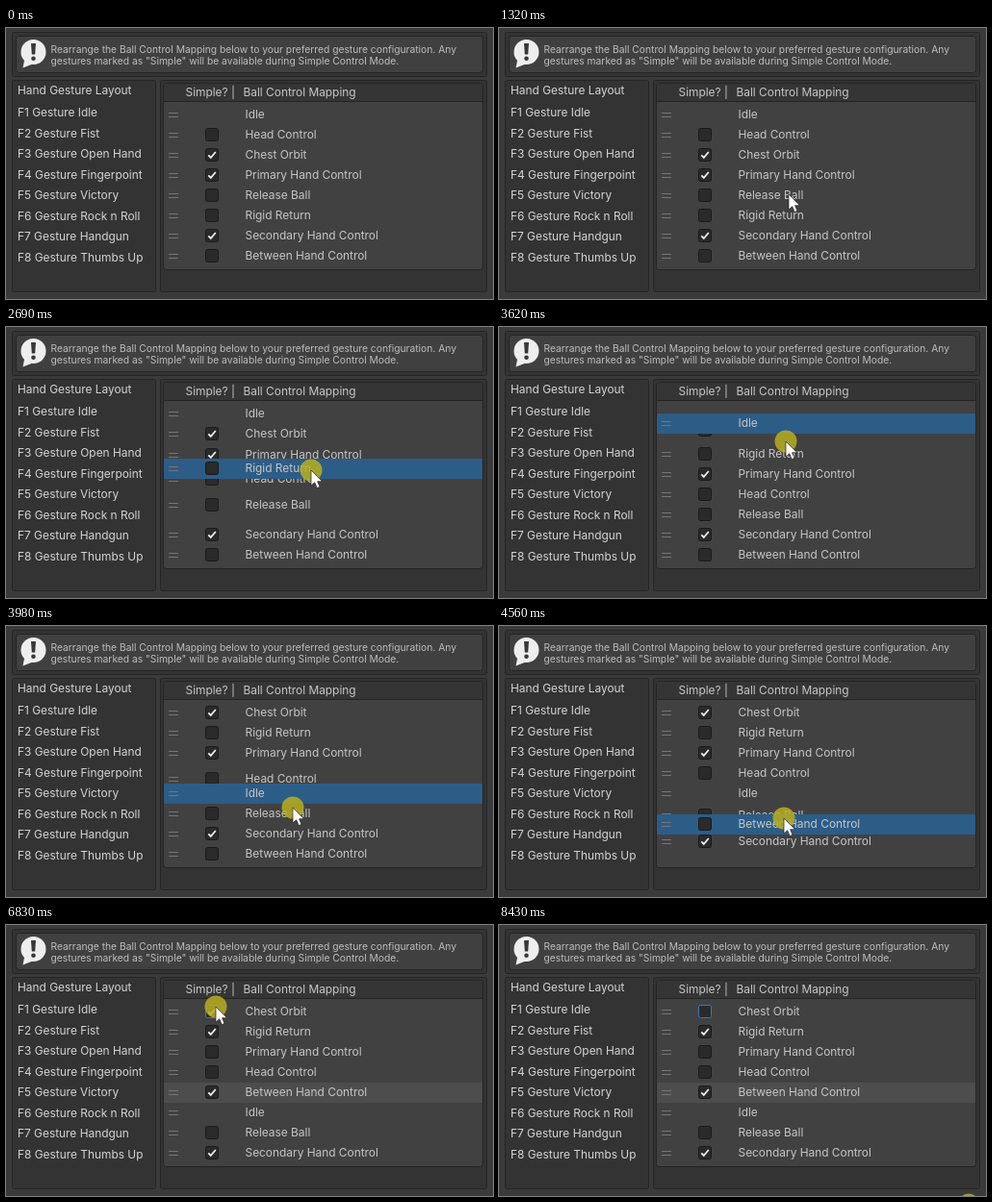
These frames come from a looping animation (506x282 px, 8.49 s). An HTML page:

```html
<!DOCTYPE html>
<html lang="en">
<head>
<meta charset="utf-8">
<title>Ball control mapping</title>
<style>
  html, body { margin: 0; width: 100%; height: 100%; overflow: hidden; background: #3a3a3a; }
  svg { display: block; width: 506px; height: 282px; }
  text { font: 11.9px Inter, sans-serif; fill: #c6c6c6; white-space: pre; }
  .label { fill: #d4d4d4; }
  .help { font-size: 10.27px; fill: #bdbdbd; }
  .panel { fill: #333; stroke: #252525; }
  .grip { stroke: #757575; }
  .box { fill: #2a2a2a; stroke: #1a1a1a; }
  .tick { fill: none; stroke: #f0f0f0; stroke-width: 1.7; }
</style>
</head>
<body>
<svg viewBox="0 0 506 282">
  <rect class="panel" x="6.5" y="4.5" width="493" height="46" rx="2"/>
  <rect x="10.5" y="8.5" width="485" height="38" rx="3" fill="#404040" stroke="#242424"/>
  <path d="M19 34 L17.5 41.5 L29 37 Z" fill="#eee"/>
  <circle cx="28.5" cy="25" r="13" fill="#eee"/>
  <path d="M26 16 H31 L30.2 27.5 H26.8 Z" fill="#383838"/>
  <circle cx="28.5" cy="31.8" r="2.3" fill="#383838"/>
  <text class="help" x="46.5" y="25.5">Rearrange the Ball Control Mapping below to your preferred gesture configuration. Any</text>
  <text class="help" x="46.5" y="37.5">gestures marked as "Simple" will be available during Simple Control Mode.</text>
  <rect class="panel" x="6.5" y="54.5" width="149" height="220" rx="2"/>
  <rect class="panel" x="160.5" y="54.5" width="339" height="220" rx="2"/>
  <g id="labels"></g>
  <rect x="163.5" y="57.5" width="332" height="194" rx="3" fill="#414141" stroke="#242424"/>
  <path d="M164 76 V60 Q164 58 166 58 H493 Q495 58 495 60 V76 Z" fill="#353535"/>
  <path d="M164 76.5 H495" stroke="#242424"/>
  <text x="186.5" y="71">Simple? |</text>
  <text x="246.5" y="71">Ball Control Mapping</text>
  <g id="rows"></g>
  <circle id="press" r="11.5" fill="#b9ae20" fill-opacity=".85"/>
  <path id="arrow" d="M0 0 V16 L3.7 12.7 L6.2 18.6 L9 17.4 L6.6 11.7 H11.6 Z" fill="#fff" stroke="#222" stroke-width=".7"/>
</svg>
<script>
(() => {
  const LOOP = 8490, PITCH = 21;
  const REACH = 18, SLIDE = 220;  // a row gives way at this distance, over this time
  const LEAD = 20, DROP = 50;     // the dragged row lags the pointer and drops late
  const $ = id => document.getElementById(id);
  const slot = i => 90 + PITCH * i;
  const clamp = k => Math.min(1, Math.max(0, k));
  const ease = k => k * k * (3 - 2 * k);
  const unease = p => 0.5 - Math.sin(Math.asin(1 - 2 * p) / 3);

  function make(parent, tag, attrs, text) {
    const el = document.createElementNS('http://www.w3.org/2000/svg', tag);
    for (const k in attrs) el.setAttribute(k, attrs[k]);
    if (text) el.textContent = text;
    return parent.appendChild(el);
  }

  ['Hand Gesture Layout', 'F1 Gesture Idle', 'F2 Gesture Fist', 'F3 Gesture Open Hand',
   'F4 Gesture Fingerpoint', 'F5 Gesture Victory', 'F6 Gesture Rock n Roll',
   'F7 Gesture Handgun', 'F8 Gesture Thumbs Up'].forEach((name, i) =>
    make($('labels'), 'text', { class: 'label', x: 12, y: i ? Math.round(70.8 + 21.5 * i) : 69 }, name));

  const [IDLE, HEAD, CHEST, PRIMARY, , RIGID, SECONDARY, BETWEEN] = [0, 1, 2, 3, 4, 5, 6, 7];
  const rows = ['Idle', 'Head Control', 'Chest Orbit', 'Primary Hand Control', 'Release Ball',
    'Rigid Return', 'Secondary Hand Control', 'Between Hand Control'].map(addRow);

  function addRow(name, i) {
    const g = make($('rows'), 'g', {});
    const row = { g, on: [CHEST, PRIMARY, SECONDARY].includes(i) };
    row.bar = make(g, 'rect', { x: 164, y: -10, width: 331, height: PITCH });
    make(g, 'path', { class: 'grip', d: 'M169 -1.5 H179 M169 2.5 H179' });
    if (i !== IDLE) {
      row.box = make(g, 'rect', { class: 'box', x: 207.5, y: -6.5, width: 13, height: 13, rx: 2 });
      row.tick = make(g, 'path', { class: 'tick', d: 'M210.3 0.3 L212.8 2.9 L217.8 -3' });
    }
    make(g, 'text', { x: 248.5, y: 4 }, name);
    return row;
  }

  // at/up: button down and up; from/till: span of the drag; grab: pointer below row centre
  const drags = [
    { row: HEAD, to: 3, at: 1560, from: 1590, till: 1900, up: 1960, x: 300, grab: 7, stop: 139 },
    { row: RIGID, to: 2, at: 2400, from: 2550, till: 2755, up: 2870, x: 317, grab: 10 },
    { row: IDLE, to: 4, at: 3440, from: 3533, till: 3953, up: 4060, x: 298, grab: 15 },
    { row: BETWEEN, to: 4, at: 4410, from: 4445, till: 4677, up: 4780, x: 296, grab: 3 }
  ];
  const clicks = [
    { row: BETWEEN, at: 5320, x: 212, y: 172 },
    { row: RIGID, at: 5850, x: 211, y: 106 },
    { row: PRIMARY, at: 6330, x: 216, y: 132 },
    { row: CHEST, at: 6800, x: 218, y: 85 },
    { row: -1, at: 8430, x: 488, y: 291 }
  ];
  for (const c of clicks) c.up = c.at + 100;

  function reorder(order, d) {
    order.splice(d.to, 0, ...order.splice(order.indexOf(d.row), 1));
  }

  const planned = [...rows.keys()];
  for (const d of drags) {
    d.index = planned.indexOf(d.row);
    d.y0 = slot(d.index);
    d.y1 = d.stop || slot(d.to);
    reorder(planned, d);
  }

  const dragY = (d, t) => d.y0 + (d.y1 - d.y0) * ease(clamp((t - d.from) / (d.till - d.from)));

  // how far the row at index i has given way to the dragged one
  function shift(d, i, t) {
    const dir = Math.sign(d.to - d.index), steps = (i - d.index) * dir;
    if (steps < 1 || steps > Math.abs(d.to - d.index)) return 0;
    const p = clamp((steps * PITCH - REACH) / Math.abs(d.y1 - d.y0));
    const begin = d.from + unease(p) * (d.till - d.from);
    return -dir * PITCH * clamp((t - begin) / SLIDE);
  }

  function layout(t) {
    const order = [...rows.keys()], ys = [];
    const done = drags.filter(d => t >= d.up + DROP);
    done.forEach(d => reorder(order, d));
    const d = drags[done.length];
    order.forEach((r, i) => {
      ys[r] = !d ? slot(i) : r === d.row ? dragY(d, t) : slot(i) + shift(d, i, t);
    });
    return ys;
  }

  // places where the pointer works; it glides from one to the next
  const still = (begin, end, x, y) => ({ begin, end, x, y: () => y });
  const stops = [
    still(0, 1010, 304, 300),
    ...drags.map(d => ({ begin: d.at - 60, end: d.up + 60, x: d.x, y: t => dragY(d, t + LEAD) + d.grab })),
    ...clicks.map(c => still(c.at - 190, c.at + 160, c.x, c.y))
  ];
  stops.splice(-1, 0, still(7140, 8200, 236, 300));

  function pointer(t) {
    const i = stops.findIndex(s => t < s.end), b = stops[i];
    if (t >= b.begin) return [b.x, b.y(t)];
    const a = stops[i - 1], k = ease((t - a.end) / (b.begin - a.end));
    const ay = a.y(a.end), by = b.y(b.begin);
    return [a.x + (b.x - a.x) * k, ay + (by - ay) * k];
  }

  const latest = (list, t) => {
    const hit = list.filter(a => a.row >= 0 && a.at <= t).pop();
    return hit ? hit.row : -1;
  };
  const place = (el, x, y) => el.setAttribute('transform', `translate(${Math.round(x)} ${Math.round(y)})`);
  const show = (el, on) => { el.style.visibility = on ? 'visible' : 'hidden'; };

  function draw(t) {
    const active = latest(drags, t), focused = latest(clicks, t), ys = layout(t);
    rows.forEach((row, i) => {
      place(row.g, 0, ys[i]);
      row.bar.style.fill = i !== active ? 'none' : focused < 0 ? '#2c5d87' : '#4d4d4d';
      if (!row.box) return;
      const flipped = clicks.some(c => c.row === i && t >= c.up);
      show(row.tick, row.on !== flipped);
      row.box.style.stroke = i === focused ? '#3a79bb' : '';
    });
    if (active >= 0 && $('rows').lastChild !== rows[active].g) $('rows').append(rows[active].g);
    const [x, y] = pointer(t);
    place($('arrow'), x, y);
    place($('press'), x, y);
    show($('press'), [...drags, ...clicks].some(a => t >= a.at && t < a.up));
  }

  const start = performance.now();
  function tick() {
    draw((performance.now() - start) % LOOP);
    requestAnimationFrame(tick);
  }
  tick();
})();
</script>
</body>
</html>
```
